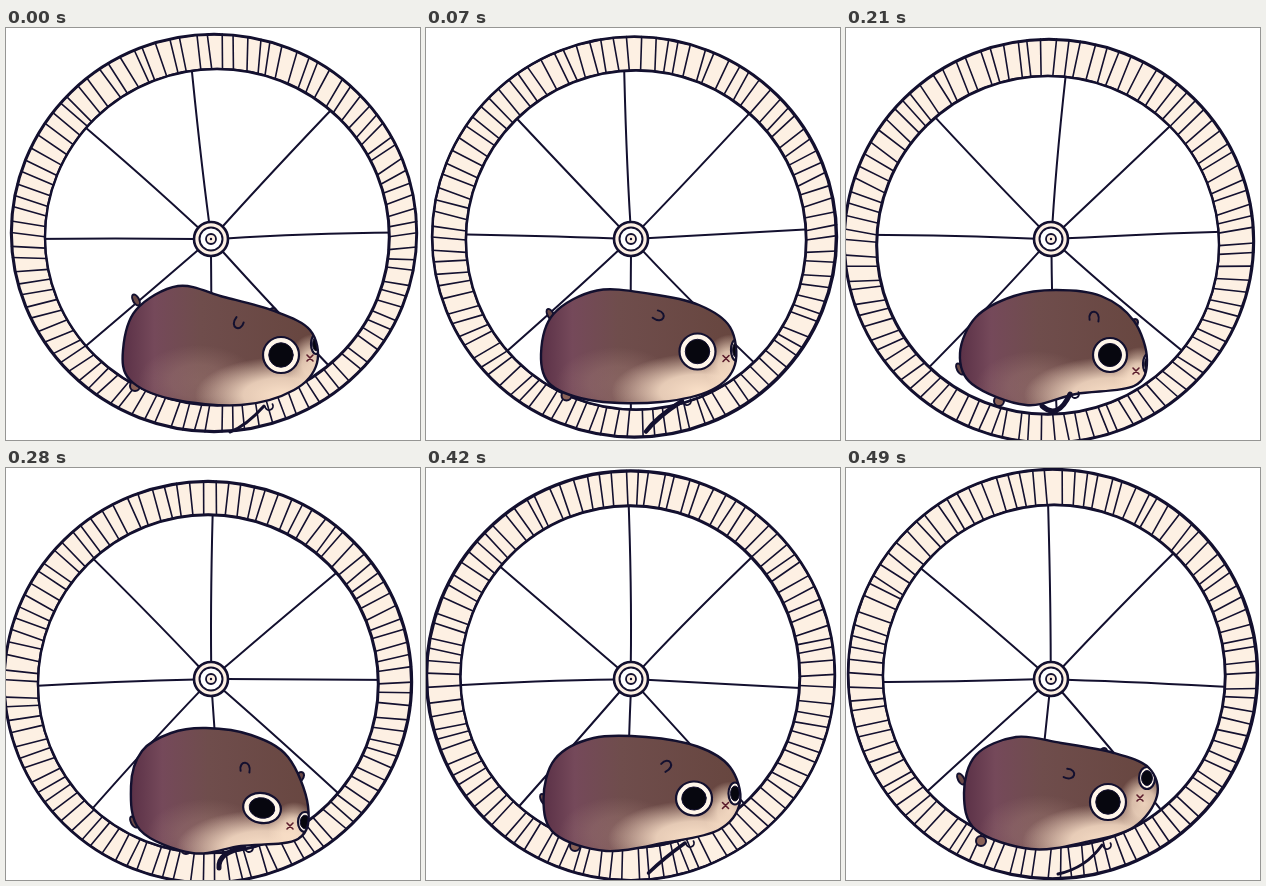
An HTML page with a canvas that plays this animation: 414 by 412 pixels, repeating every 560 ms.

```html
<!DOCTYPE html>
<html lang="en">
<head>
<meta charset="utf-8">
<title>Hamster wheel</title>
<style>
  html, body { margin: 0; width: 100%; height: 100%; overflow: hidden; background: #fff; }
  canvas { display: block; }
</style>
</head>
<body>
<canvas id="stage" width="414" height="412"></canvas>
<script>
const ctx = document.getElementById('stage').getContext('2d');
const INK = '#13102f', CREAM = '#fdf0e3', BROWN = '#6c4b48';
const STEP = 70, TAU = Math.PI * 2;

// Each drawn step blends two key poses.
const BLENDS = [[0, 0], [0, 1], [1, 1], [2, 2], [3, 3], [4, 4], [4, 5], [5, 5]];

// outer ellipse (cx, cy, rx, ry), inner ellipse
const WHEELS = [
  [208, 205, 203, 199, 211, 209, 172, 168],
  [209, 213, 202, 202, 209, 215, 168, 171],
  [203, 213, 205, 202, 202, 217, 171, 169],
  [202, 214, 204, 201, 202, 216, 170, 169],
  [202, 209, 204, 205, 200, 210, 168, 171],
  [207, 206, 205, 205, 208, 208, 171, 171]
];

// spoke angles in degrees
const SPOKES = [
  [-96.4, -47, -2, 47, 90, 139.5, 180, 221.5],
  [-88, -46.5, -4.3, 43, 90, 136.4, 183, 231.6],
  [-84.7, -43.5, -2.4, 40.3, 88, 133.6, 181.3, 226.5],
  [-89.3, -40.2, 0.3, 42, 86, 132.4, 177.7, 225.5],
  [-90.7, -44.5, 3.5, 45.5, 86, 125, 176.7, 221],
  [-91, -45.7, 2.6, 50, 96, 137.7, 179, 220.3]
];

// outline, clockwise from the rump
const BODIES = [
  [117, 322, 130, 282, 172, 258, 218, 269, 268, 283, 304, 302, 311, 335, 288, 362, 235, 377, 165, 371, 124, 352],
  [113, 330, 125, 290, 170, 267, 232, 263, 278, 271, 304, 296, 307, 338, 285, 361, 235, 371, 175, 375, 126, 362],
  [114, 325, 130, 289, 168, 268, 210, 262, 255, 268, 288, 293, 301, 332, 288, 358, 230, 366, 180, 377, 126, 356],
  [125, 318, 136, 283, 165, 265, 200, 260, 245, 267, 282, 289, 302, 338, 292, 371, 235, 378, 186, 385, 134, 362],
  [117, 338, 128, 295, 165, 271, 225, 263, 275, 272, 305, 298, 317, 340, 297, 365, 240, 375, 175, 385, 128, 370],
  [118, 325, 130, 287, 170, 269, 215, 275, 268, 285, 303, 300, 311, 328, 288, 359, 240, 374, 185, 381, 130, 362]
];

// eye (x, y, rx, ry, tilt), mouth, far eye (x, y, rx, ry), ear (x, y, turn), far ear
const FACES = [
  [275, 327, 18, 18, 0, 304, 330, 310, 316, 5, 10, 232, 296, 3.6, 267, 283],
  [268, 320, 18, 18, 0, 296, 331, 310, 328, 5, 11, 235, 280, 0.4, 293, 289],
  [264, 327, 17, 17, 0, 290, 343, 302, 336, 5, 10, 248, 288, 0, 289, 294],
  [256, 340, 19, 15, 0.2, 284, 358, 299, 354, 7, 10, 239, 299, 0, 295, 307],
  [274, 327, 18, 16, -0.1, 305, 345, 317, 341, 5, 11, 258, 288, 0, 299, 295],
  [262, 334, 18, 18, 0, 294, 330, 301, 310, 8, 11, 224, 306, 1.8, 258, 283]
];

// tail, hind foot, foreleg curve, leg width
const LIMBS = [
  [130, 272, 129, 358, 224, 404, 240, 398, 258, 378, 3],
  [119, 301, 152, 377, 216, 403, 222, 380, 254, 368, 6],
  [114, 341, 153, 373, 196, 378, 212, 392, 224, 366, 5],
  [128, 354, 180, 381, 213, 400, 212, 384, 238, 380, 5],
  [121, 352, 163, 383, 233, 404, 236, 380, 262, 373, 4],
  [115, 311, 135, 373, 212, 406, 240, 400, 256, 377, 3]
];

const pose = (table, [a, b]) => table[a].map((v, i) => (v + table[b][i]) / 2);

function seeded(seed) {
  return () => {
    const v = Math.sin(++seed * 127.1) * 43758.5453;
    return v - Math.floor(v) - 0.5;
  };
}

function stroke(width) {
  ctx.lineWidth = width;
  ctx.strokeStyle = INK;
  ctx.stroke();
}

function ellipse(x, y, rx, ry, fill, width, tilt = 0) {
  ctx.beginPath();
  ctx.ellipse(x, y, rx, ry, tilt, 0, TAU);
  if (fill) { ctx.fillStyle = fill; ctx.fill(); }
  if (width) stroke(width);
}

function drawWheel([cx, cy, rx, ry, ix, iy, irx, iry], angles, step) {
  const rand = seeded(step * 400 + 7);
  const hubX = 205, hubY = 211;

  for (const deg of angles) {
    const a = deg * Math.PI / 180, c = Math.cos(a), s = Math.sin(a), bend = rand() * 5;
    ctx.beginPath();
    ctx.moveTo(hubX + c * 15, hubY + s * 15);
    ctx.quadraticCurveTo(hubX + c * 90 - s * bend, hubY + s * 90 + c * bend, hubX + c * 188, hubY + s * 188);
    stroke(2);
  }

  ctx.beginPath();
  ctx.ellipse(cx, cy, rx, ry, 0, 0, TAU);
  ctx.ellipse(ix, iy, irx, iry, 0, 0, TAU);
  ctx.fillStyle = CREAM;
  ctx.fill('evenodd');

  const rungs = 98;
  ctx.beginPath();
  for (let i = 0; i < rungs; i++) {
    const a = (i + rand() * 0.4) / rungs * TAU, b = a + rand() * 0.02;
    ctx.moveTo(cx + rx * Math.cos(a), cy + ry * Math.sin(a));
    ctx.lineTo(ix + irx * Math.cos(b), iy + iry * Math.sin(b));
  }
  stroke(1.6);

  // Two offset passes give the uneven weight of a brush line.
  ellipse(cx, cy, rx, ry, null, 2.4);
  ellipse(cx + rand(), cy + rand(), rx - 0.8, ry - 0.8, null, 2);
  ellipse(ix, iy, irx, iry, null, 2.4);
  ellipse(ix + rand(), iy + rand(), irx + 0.6, iry + 0.6, null, 1.8);

  ellipse(hubX, hubY, 17, 17, CREAM, 2.6);
  ellipse(hubX, hubY, 11.5, 11.5, '#fff', 2);
  ellipse(hubX, hubY, 5, 5, CREAM, 1.8);
  ellipse(hubX, hubY, 1.2, 1.2, INK);
}

function smoothOutline(flat) {
  const n = flat.length / 2;
  const at = i => { const k = (i + n) % n * 2; return [flat[k], flat[k + 1]]; };
  const path = new Path2D();
  path.moveTo(...at(0));
  for (let i = 0; i < n; i++) {
    const [p, q, r, s] = [at(i - 1), at(i), at(i + 1), at(i + 2)];
    path.bezierCurveTo(
      q[0] + (r[0] - p[0]) / 6, q[1] + (r[1] - p[1]) / 6,
      r[0] - (s[0] - q[0]) / 6, r[1] - (s[1] - q[1]) / 6, r[0], r[1]);
  }
  path.closePath();
  return path;
}

function glow(x, y, rx, ry, rgb, alpha) {
  ctx.save();
  ctx.translate(x, y);
  ctx.scale(rx, ry);
  const g = ctx.createRadialGradient(0, 0, 0, 0, 0, 1);
  g.addColorStop(0, `rgba(${rgb},${alpha})`);
  g.addColorStop(0.45, `rgba(${rgb},${alpha * 0.85})`);
  g.addColorStop(1, `rgba(${rgb},0)`);
  ctx.fillStyle = g;
  ctx.fillRect(-1, -1, 2, 2);
  ctx.restore();
}

function drawEar(x, y, turn, size) {
  ctx.save();
  ctx.translate(x, y);
  ctx.rotate(turn);
  ctx.beginPath();
  ctx.moveTo(-size * 0.8, size * 0.7);
  ctx.bezierCurveTo(-size * 1.2, -size * 1.3, size * 1.3, -size * 1.3, size * 0.8, size);
  ctx.fillStyle = BROWN;
  ctx.fill();
  stroke(2);
  ctx.restore();
}

function drawEye(x, y, rx, ry, tilt) {
  ellipse(x, y, rx, ry, '#fff6ea', 2.2, tilt);
  ellipse(x, y, rx * 0.68, ry * 0.68, '#07070f', 1, tilt);
}

function drawHamster(body, face, limbs) {
  const [ex, ey, erx, ery, tilt, mx, my, fx, fy, frx, fry, ax, ay, turn, bx, by] = face;
  const [tx, ty, hx, hy, x0, y0, qx, qy, x1, y1, width] = limbs;
  const outline = smoothOutline(body);

  ellipse(tx, ty, 3, 6, BROWN, 2, -0.5);
  ellipse(hx, hy, 5, 5, '#8a6258', 2);
  drawEar(bx, by, 0.5, 4);

  ctx.save();
  ctx.clip(outline);
  const left = body[0];
  const fur = ctx.createLinearGradient(left, 0, left + 195, 0);
  fur.addColorStop(0, '#5b3147');
  fur.addColorStop(0.16, '#75495a');
  fur.addColorStop(0.4, '#6f4d4c');
  fur.addColorStop(1, '#67463f');
  ctx.fillStyle = fur;
  ctx.fillRect(100, 250, 230, 150);
  glow(left + 75, body[19] - 18, 60, 36, '178,140,132', 0.35);
  glow(ex + 2, ey + 40, 88, 38, '250,224,200', 1);
  glow(mx + 4, my + 6, 26, 30, '250,224,200', 0.9);
  drawEye(fx, fy, frx, fry, 0);
  ctx.restore();

  ctx.lineWidth = 2.4;
  ctx.strokeStyle = INK;
  ctx.stroke(outline);

  drawEar(ax, ay, turn, 5.5);
  drawEye(ex, ey, erx, ery, tilt);

  ctx.beginPath();
  ctx.moveTo(mx - 3, my - 3);
  ctx.lineTo(mx + 3, my + 3);
  ctx.moveTo(mx + 3, my - 3);
  ctx.lineTo(mx - 3, my + 3);
  ctx.lineWidth = 1.6;
  ctx.strokeStyle = '#5a1c2c';
  ctx.stroke();

  ctx.beginPath();
  ctx.moveTo(x0, y0);
  ctx.quadraticCurveTo(qx, qy, x1, y1);
  stroke(width);
  ctx.beginPath();
  ctx.arc(x1 + 5, y1, 4, -0.5, 3);
  stroke(1.8);
}

function draw(step) {
  const blend = BLENDS[step];
  ctx.fillStyle = '#fff';
  ctx.fillRect(0, 0, 414, 412);
  drawWheel(pose(WHEELS, blend), pose(SPOKES, blend), step);
  drawHamster(pose(BODIES, blend), pose(FACES, blend), pose(LIMBS, blend));
}

ctx.lineCap = ctx.lineJoin = 'round';
let start = null, shown = -1;

function tick(now) {
  start ??= now;
  const step = Math.floor((now - start) / STEP) % BLENDS.length;
  if (step !== shown) draw(shown = step);
  requestAnimationFrame(tick);
}

draw(0);
requestAnimationFrame(tick);
</script>
</body>
</html>
```
